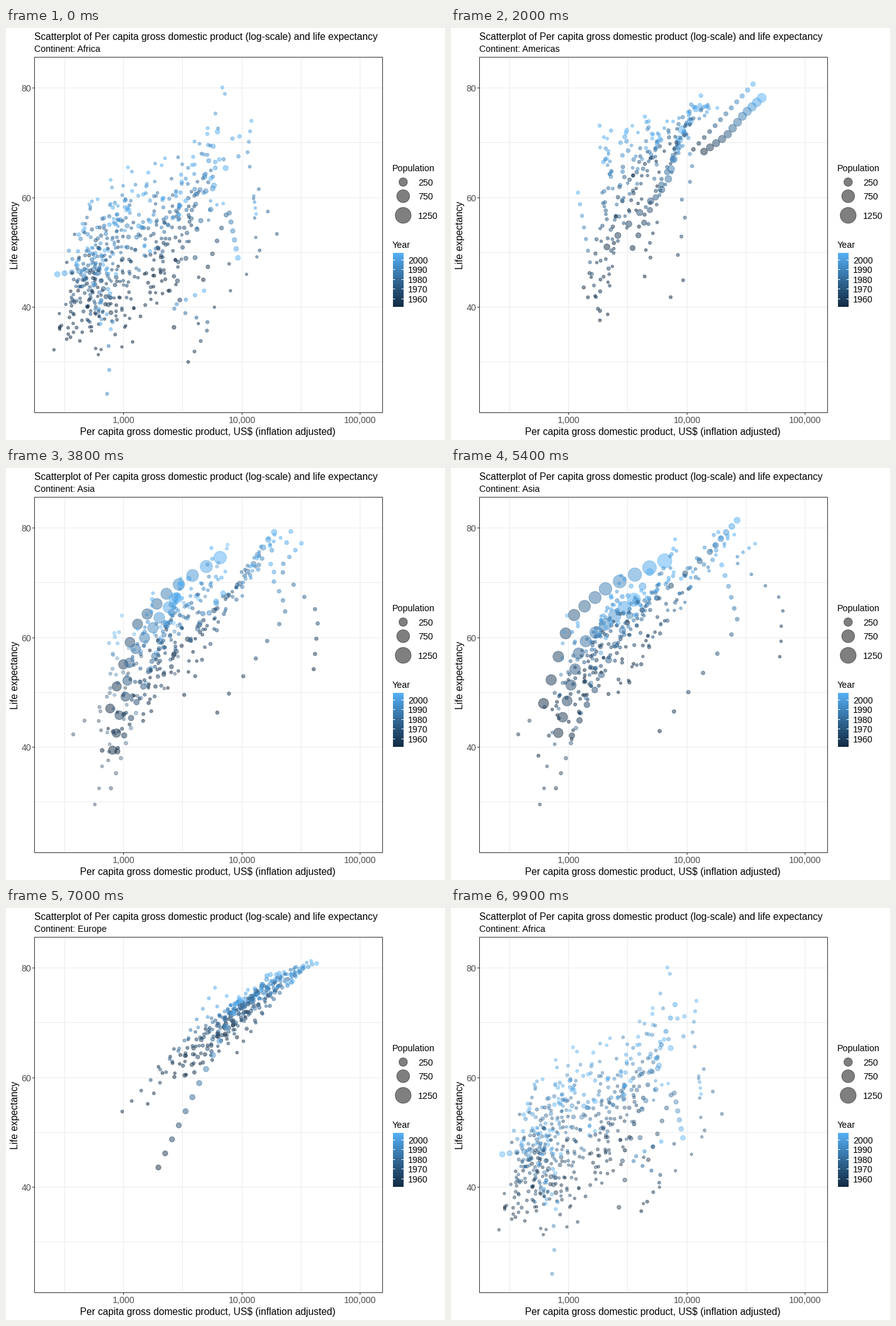
A matplotlib script that plays this animation: 700 by 656 pixels, repeating every 10 s.

```python
import numpy as np
import matplotlib.pyplot as plt
from matplotlib.animation import FuncAnimation
from matplotlib.patches import Circle, Rectangle

W, H, DPI = 700, 656, 100
PX = 72 / DPI
HOLD, STEPS = 14, 7          # frames at rest, steps per transition
CYCLE = HOLD + STEPS - 1
T = np.linspace(0, 1, 12)    # 1952 to 2007, every five years

plt.rcParams["font.family"] = "Liberation Sans"

# gdp (log10) and life: (poorest, richest, spread) at the start and at the end.
# bow: mid-period lift of both. pop: population ratio start / end.
# standouts: slot -> (population in millions, then GDP, life at even time steps).
REGIONS = [
    dict(name="Africa", slots=52, pop=.3, bow=(.02, 3.5),
         gdp=((2.55, 3.45, .12), (2.65, 3.9, .17)),
         life=((36, 45, 4), (46, 70, 5)),
         standouts={
             0: (33, 2449, 43, 6223, 72),
             1: (12, 3521, 30, 5500, 37, 2500, 40, 4797, 43),
             10: (65, 781, 39, 600, 47, 275, 46),
             18: (1.4, 4293, 37, 13500, 48, 12500, 61, 13206, 57),
             26: (6, 2387, 43, 21000, 52, 11000, 67, 12057, 74),
             38: (9, 494, 40, 560, 44, 780, 46, 720, 22, 863, 46),
             43: (44, 4725, 45, 7700, 58, 9270, 49),
         }),
    dict(name="Americas", slots=25, pop=.48, bow=(.06, 2.5),
         gdp=((3.2, 3.85, .1), (3.45, 4.15, .12)),
         life=((43, 63, 5), (70, 78, 1.8)),
         standouts={
             2: (190, 2109, 51, 6800, 62.5, 9066, 72.4),
             3: (33, 11367, 68.8, 36319, 80.7),
             4: (16, 3940, 54.7, 13172, 78.6),
             12: (8, 1840, 37.6, 1202, 60.9),
             15: (108, 3478, 50.8, 11978, 76.2),
             22: (301, 13990, 68.4, 21500, 71.2, 30500, 75.2, 42952, 78.2),
         }),
    dict(name="Asia", slots=33, pop=.42, bow=(.03, 2),
         gdp=((2.65, 3.7, .1), (3.05, 4.5, .12)),
         life=((39, 57, 5), (63, 80, 2.5)),
         standouts={
             4: (1319, 400, 44, 660, 61.5, 1470, 67.8, 4959, 73),
             6: (1110, 547, 37.4, 790, 55.2, 2452, 64.7),
             7: (223, 750, 37.5, 3541, 70.7),
             11: (127, 3217, 63, 17200, 76, 31656, 82.6),
             15: (2.5, 108382, 55.6, 105000, 66.5, 30500, 74.6, 47307, 77.6),
             24: (28, 6460, 40, 34000, 61, 21655, 72.8),
             32: (22, 782, 32.5, 2281, 62.7),
         }),
    dict(name="Europe", slots=30, pop=.75, bow=(.08, 1.8),
         gdp=((3.42, 4.1, .08), (4, 4.6, .06)),
         life=((61, 72, 1.8), (74, 81, .7)),
         standouts={
             0: (4, 1601, 55.2, 5937, 76.4),
             3: (4, 974, 53.8, 7446, 74.9),
             28: (71, 1969, 43.6, 8458, 71.8),
         }),
    dict(name="Oceania", slots=2, pop=.5,
         standouts={
             0: (20, 10040, 69.1, 18900, 74.1, 34435, 81.2),
             1: (4, 10557, 69.4, 16900, 73, 25185, 80.2),
         }),
]


def x_pos(log_gdp):
    return 187.5 + 188.5 * (log_gdp - 3)


def y_pos(life):
    return 95.5 + 8.725 * (80 - life)


def radius(pop):
    return 1.9 + 11 * np.sqrt(pop / 1319)


def generated(rng, ends, bow, wealth):
    """Values over time between two random ends, lifted in the middle."""
    start, end = (lo + (hi - lo) * wealth + rng.normal(0, sd) for lo, hi, sd in ends)
    jitter = rng.normal(0, ends[1][2] / 5, len(T))
    return start + (end - start) * T + bow * 4 * T * (1 - T) + jitter


def key_points(values):
    gdp, life = np.reshape(values, (-1, 2)).T
    knots = np.linspace(0, 1, len(gdp))
    return np.interp(T, knots, np.log10(gdp)), np.interp(T, knots, life)


def build(region, seed):
    """Rows of x, y, radius: one per slot and year."""
    rng = np.random.default_rng(seed)
    slots = region["slots"]
    wealth = ((rng.permutation(slots) + .5) / slots) ** 1.3
    rows = []
    for slot in range(slots):
        if slot in region["standouts"]:
            pop, *values = region["standouts"][slot]
            gdp, life = key_points(values)
        else:
            pop = rng.lognormal(2, .9)
            gdp, life = (generated(rng, region[key], bow, wealth[slot])
                         for key, bow in zip(("gdp", "life"), region["bow"]))
        size = radius(pop * region["pop"] ** (1 - T))
        rows.append(np.column_stack([x_pos(gdp), y_pos(life), size]))
    return np.vstack(rows)


def year_color(t):
    stops = np.array([[19, 43, 67], [51, 106, 152], [86, 177, 247]]) / 255
    return np.column_stack([np.interp(t, [0, .5, 1], c) for c in stops.T])


STATES = [build(region, 7 + i) for i, region in enumerate(REGIONS)]
COLORS = year_color(T)

fig = plt.figure(figsize=(W / DPI, H / DPI), dpi=DPI, facecolor="white")
ax = fig.add_axes([0, 0, 1, 1])
ax.axis("off")


def label(x, y, text, size=14.2, color="black", **kw):
    return ax.text(x, y, text, fontsize=size * PX, color=color, **kw)


def line(xs, ys, color, z=1):
    ax.plot(xs, ys, color=color, lw=PX, zorder=z, solid_capstyle="butt", snap=False)


def center(v):
    """Middle of the pixel that holds v, for crisp lines."""
    return np.floor(v) + .5


# Panel
L, R, TOP, BOTTOM = 45.5, 600.5, 46.5, 612.5
for log_gdp in np.arange(2.5, 5.1, .5):
    line([center(x_pos(log_gdp))] * 2, [TOP, BOTTOM], "#EBEBEB")
for life in range(30, 81, 10):
    line([L, R], [center(y_pos(life))] * 2, "#EBEBEB")
for power in (3, 4, 5):
    x = center(x_pos(power))
    line([x, x], [BOTTOM, BOTTOM + 3.5], "#333333", 3)
    label(x, 629, f"{10 ** power:,}", color="#4D4D4D", ha="center")
for life in (40, 60, 80):
    y = center(y_pos(life))
    line([L - 3.5, L], [y, y], "#333333", 3)
    label(40, y + 5.5, str(life), color="#4D4D4D", ha="right")
ax.add_patch(Rectangle((L, TOP), R - L, BOTTOM - TOP, fill=False, ec="#333333",
                       lw=PX, zorder=4, snap=False))

# Titles
label(45, 19, "Scatterplot of Per capita gross domestic product (log-scale) and life expectancy", 15.65)
subtitle = label(45, 38, "")
label(322, 648, "Per capita gross domestic product, US$ (inflation adjusted)", 15.65, ha="center")
label(19, 330, "Life expectancy", 15.65, rotation=90, rotation_mode="anchor", ha="center")

# Legends
label(616, 228, "Population")
for pop, y in ((250, 245.3), (750, 267.8), (1250, 298.3)):
    ax.add_patch(Circle((633.3, y), radius(pop), fc=(0, 0, 0, .5), ec=(0, 0, 0, .5), lw=PX))
    label(657, y + 5.5, str(pop))
label(616, 350, "Year")
ax.imshow(year_color(np.linspace(1, 0, 86))[:, None], extent=(617, 634, 444, 358), aspect="auto")
for year in range(1960, 2001, 10):
    y = center(358.5 + (2007 - year) * 1.545)
    line([617, 620.5], [y, y], "white", 3)
    line([630.5, 634], [y, y], "white", 3)
    label(641, y + 5.5, str(year))

dots = ax.scatter([], [], linewidths=.945 * PX, zorder=2)
ax.set(xlim=(0, W), ylim=(H, 0))


def update(frame):
    index, step = divmod(frame, CYCLE)
    t = max(0, step - HOLD + 1) / STEPS
    following = (index + 1) % len(STATES)
    a, b = STATES[index], STATES[following]
    n = min(len(a), len(b))
    # Shared rows move; surplus rows fade out or in.
    rows = np.vstack([a[:n] + (b[:n] - a[:n]) * t, a[n:], b[n:]])
    alpha = np.repeat([.5, .5 * (1 - t), .5 * t], [n, len(a) - n, len(b) - n])
    rgba = np.column_stack([np.tile(COLORS, (len(rows) // len(T), 1)), alpha])
    dots.set_offsets(rows[:, :2])
    dots.set_sizes((2 * rows[:, 2] * PX) ** 2)
    dots.set_facecolor(rgba)
    dots.set_edgecolor(rgba)
    subtitle.set_text("Continent: " + REGIONS[index if t < .5 else following]["name"])
    return dots, subtitle


animation = FuncAnimation(fig, update, frames=CYCLE * len(STATES), interval=100, repeat=True)
plt.show()
```
